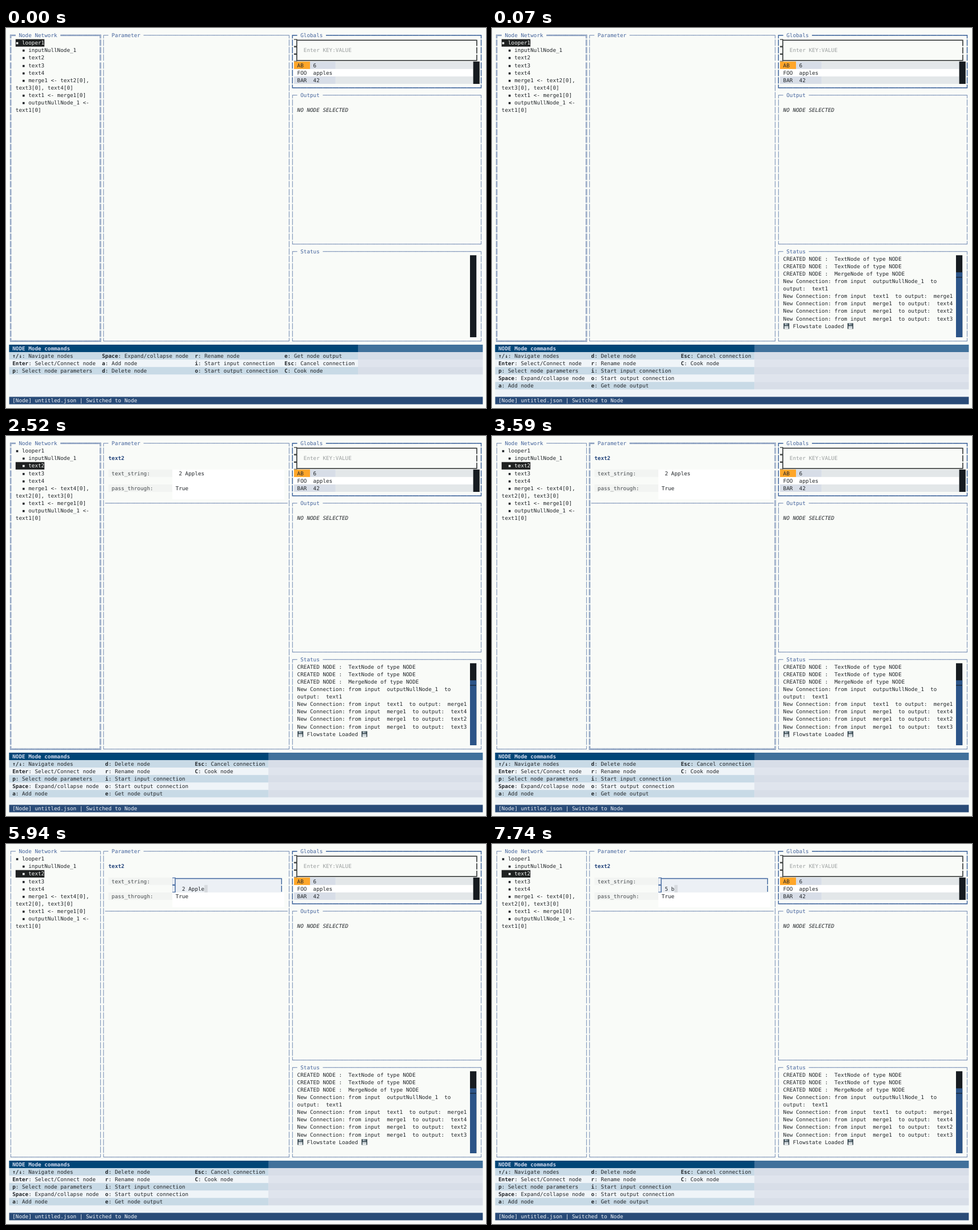
Animation of 840 by 666 pixels, one loop 7990 ms. Source, as an HTML page with a canvas:

```html
<!DOCTYPE html>
<html lang="en">
<head>
<meta charset="utf-8">
<title>Node editor</title>
<style>
html, body { margin: 0; width: 840px; height: 666px; overflow: hidden; background: #f9fbf8; }
canvas { display: block; }
</style>
</head>
<body>
<canvas id="stage" width="840" height="666"></canvas>
<script>
const ctx = document.getElementById('stage').getContext('2d');
const CW = 840 / 150, RH = 666 / 51, SIZE = 9.32, BASE = 9.75, GAP = 1.1;
const LOOP = 7990;
const C = {
  page: '#f9fbf8', ink: '#22262a', line: '#45659c', strong: '#3b629b', title: '#46659d',
  dark: '#161b20', thumb: '#2c5488', tint: '#ecf0f5', white: '#ffffff', foot: '#eff4f8'
};

const colX = c => (c + 1) * CW;
const rowY = r => (r + 0.5) * RH;

function fill(c, r, w, h, color) {
  ctx.fillStyle = color;
  ctx.fillRect(colX(c), rowY(r), w * CW, h * RH);
}

// One glyph per terminal cell
function text(c, r, str, color = C.ink, style = '') {
  ctx.save();
  ctx.scale(0.1, 0.1);
  ctx.font = `${style} ${SIZE * 10}px "DejaVu Sans Mono", monospace`;
  ctx.textRendering = 'geometricPrecision';
  ctx.fillStyle = color;
  [...str].forEach((ch, i) => {
    if (ch !== ' ') ctx.fillText(ch, colX(c + i) * 10, (rowY(r) + BASE) * 10);
  });
  ctx.restore();
}

const BOX = { thin: '┌─┐│└┘', double: '╔═╗║╚╝', heavy: '┏━┓┃┗┛' };

function panel(c, r, w, h, name, kind = 'thin') {
  const [tl, hz, tr, vt, bl, br] = BOX[kind];
  const color = kind === 'heavy' ? C.strong : C.line;
  const rest = w - name.length - 5;
  text(c, r, tl + hz + ' '.repeat(name.length + 2) + hz.repeat(rest) + tr, color);
  text(c + 3, r, name, C.title);
  for (let y = r + 1; y < r + h - 1; y++) {
    text(c, y, vt, color);
    text(c + w - 1, y, vt, color);
  }
  text(c, r + h - 1, bl + hz.repeat(w - 2) + br, color);
}

// Input frame whose side blocks are slightly shorter than a row
function field(c, r, w, h, color, inner, closed) {
  fill(c + 1, r, w - 2, h, inner);
  const x = colX(c), right = colX(c + w - 1), q = CW / 4, thick = 1.4;
  for (let i = 0; i < h; i++) {
    const y = rowY(r + i);
    fill(c, r + i, 1, 1, color);
    ctx.fillStyle = inner;
    ctx.fillRect(x, y + GAP, CW - q, RH - 2 * GAP);
    ctx.fillStyle = color;
    ctx.fillRect(right, y + GAP, q, RH - 2 * GAP);
  }
  ctx.fillRect(x + CW, rowY(r) + GAP, (w - 2) * CW, thick);
  if (closed) ctx.fillRect(x + CW, rowY(r + h) - GAP - thick, (w - 2) * CW, thick);
}

function tree(step) {
  const late = step >= 3;
  const lines = [
    '▪ looper1', '  ▪ inputNullNode_1', '  ▪ text2', '  ▪ text3', '  ▪ text4',
    late ? '  ▪ merge1 <- text4[0],' : '  ▪ merge1 <- text2[0],',
    late ? 'text2[0], text3[0]' : 'text3[0], text4[0]',
    '  ▪ text1 <- merge1[0]', '  ▪ outputNullNode_1 <-', 'text1[0]'
  ];
  const active = step >= 4 ? 2 : late ? 1 : 0;
  lines.forEach((s, i) => {
    if (i === active) fill(2, i + 1, s.length, 1, '#1f2121');
    text(2, i + 1, s, i === active ? '#f4f6f4' : C.ink);
  });
}

function params(step, t) {
  text(31, 2, 'text2', '#22437a', 'bold');
  fill(31, 4, 20, 1, '#f2f4f2');
  fill(31, 6, 20, 1, '#f2f4f2');
  text(32, 4, 'text_string:', '#454a4d');
  text(32, 6, 'pass_through:', '#454a4d');
  fill(51, 6, 35, 2, C.white);
  text(52, 6, 'True');
  text(30, 8, '─'.repeat(57), C.line);
  if (t < 4730) {
    fill(51, 4, 35, 2, step >= 7 ? C.tint : C.white);
    text(52, 4, ' 2 Apples');
    return;
  }
  const value = typed(t);
  field(51, 4, 35, 2, C.strong, C.tint, false);
  fill(53 + value.length, 5, 1, 1, '#d6dade');
  text(53, 5, value);
}

function typed(t) {
  if (t >= 7140) return '5 b'.slice(0, t >= 7740 ? 3 : t >= 7420 ? 2 : 1);
  const gone = keys.filter(k => k <= t).length;
  return ' 2 Apples '.slice(0, 10 - gone);
}

function globals() {
  panel(88, 0, 60, 8, 'Globals', 'heavy');
  field(89, 1, 58, 3, '#15191a', C.page, true);
  text(92, 2, 'Enter KEY:VALUE', '#9b9f9f');
  fill(89, 4, 56, 3, C.white);
  for (const r of [4, 6]) {
    fill(102, r, 43, 1, '#e3e7e9');
    fill(89, r, 13, 1, '#d7dde7');
  }
  fill(89, 4, 5, 1, '#ffa629');
  [['AB', '6'], ['FOO', 'apples'], ['BAR', '42']].forEach(([k, v], i) => {
    text(90, 4 + i, k);
    text(95, 4 + i, v);
  });
  fill(145, 4, 2, 3, C.dark);
}

const made = n => `CREATED NODE :  ${n}Node of type NODE`;
const linked = (a, b) => `New Connection: from input  ${a}  to output:  ${b}`;
const LOG = [
  made('Looper'), ...Array(4).fill(made('Text')), made('Merge'),
  'New Connection: from input  outputNullNode_1  to', 'output:  text1',
  linked('text1', 'merge1'),
  ...['text4', 'text2', 'text3'].map(n => linked('merge1', n)),
  '   Flowstate Loaded'
];

function disk(c, r) {
  const x = colX(c) + 0.6, y = rowY(r) + 1.6;
  const part = (dx, dy, w, h, color) => {
    ctx.fillStyle = color;
    ctx.fillRect(x + dx, y + dy, w, h);
  };
  part(0, 0, 10, 10, '#37474f');
  part(2.2, 0, 5.6, 3.4, '#b0bec5');
  part(5.6, 0.6, 1.3, 2.2, '#37474f');
  part(1.6, 5, 6.8, 5, '#eceff1');
  part(2.6, 6.6, 4.8, 0.8, '#90a4ae');
}

function status(step) {
  panel(88, 29, 60, 13, 'Status');
  fill(144, 30, 2, 11, C.dark);
  if (!step) return;
  const from = step >= 2 ? 3 : 0;
  LOG.slice(from, from + 11).forEach((s, i) => text(90, 30 + i, s));
  const x = colX(144), w = 2 * CW, part = (RH - 2 * GAP) / 8;
  if (from) {
    disk(90, 39);
    disk(110, 39);
    fill(144, 33, 2, 8, C.thumb);
    ctx.fillRect(x, rowY(33) - GAP - part * 6, w, part * 6);
  } else {
    fill(144, 30, 2, 9, C.thumb);
    ctx.fillStyle = C.dark;
    ctx.fillRect(x, rowY(39) - GAP - part * 2, w, part * 2);
  }
}

const COMMANDS = [
  '↑/↓: Navigate nodes', 'Enter: Select/Connect node', 'p: Select node parameters',
  'Space: Expand/collapse node', 'a: Add node', 'd: Delete node', 'r: Rename node',
  'i: Start input connection', 'o: Start output connection', 'e: Get node output',
  'Esc: Cancel connection', 'C: Cook node'
];

function footer(step) {
  const rows = step ? 5 : 3, cols = step ? [1, 30, 58] : [1, 29, 58, 86], wide = step ? 81 : 109;
  fill(0, 42, 148, 7, C.foot);
  fill(0, 42, 148, 1, '#41719b');
  fill(0, 42, wide, 1, '#014677');
  text(1, 42, 'NODE Mode commands', '#d6dcf0', 'bold');
  for (let i = 0; i < rows; i++) {
    fill(wide, 43 + i, 148 - wide, 1, i % 2 ? '#dfe4ed' : '#d8dee8');
    if (i % 2 === 0) fill(0, 43 + i, wide, 1, '#c8dae6');
  }
  COMMANDS.forEach((s, i) => {
    const c = cols[Math.floor(i / rows)], r = 43 + i % rows, cut = s.indexOf(':');
    text(c, r, s.slice(0, cut), C.ink, 'bold');
    text(c + cut, r, s.slice(cut));
  });
  fill(0, 49, 148, 1, '#294b78');
  text(1, 49, '[Node] untitled.json | Switched to Node', '#f0f3f7');
}

// Backspace presses: one tap, then key repeat
const keys = [5380, ...Array.from({ length: 9 }, (_, i) => 5940 + i * 42.5)];
const steps = [40, 70, 1200, 1540, 2520, 3590, 4120, 4730, ...keys, 7140, 7420, 7740];

function draw(step, t) {
  ctx.fillStyle = C.page;
  ctx.fillRect(0, 0, 840, 666);
  panel(0, 0, 29, 42, 'Node Network', step < 6 ? 'double' : 'thin');
  panel(29, 0, 59, 42, 'Parameter', step === 6 || step === 7 ? 'double' : 'thin');
  tree(step);
  if (step >= 5) params(step, t);
  globals();
  panel(88, 8, 60, 21, 'Output');
  text(90, 10, 'NO NODE SELECTED', C.ink, 'italic');
  status(step);
  footer(step);
}

let shown = -1;
const start = performance.now();

function tick() {
  const t = (performance.now() - start) % LOOP;
  const step = steps.filter(s => s <= t).length;
  if (step !== shown) draw(shown = step, t);
  requestAnimationFrame(tick);
}
tick();
</script>
</body>
</html>
```
